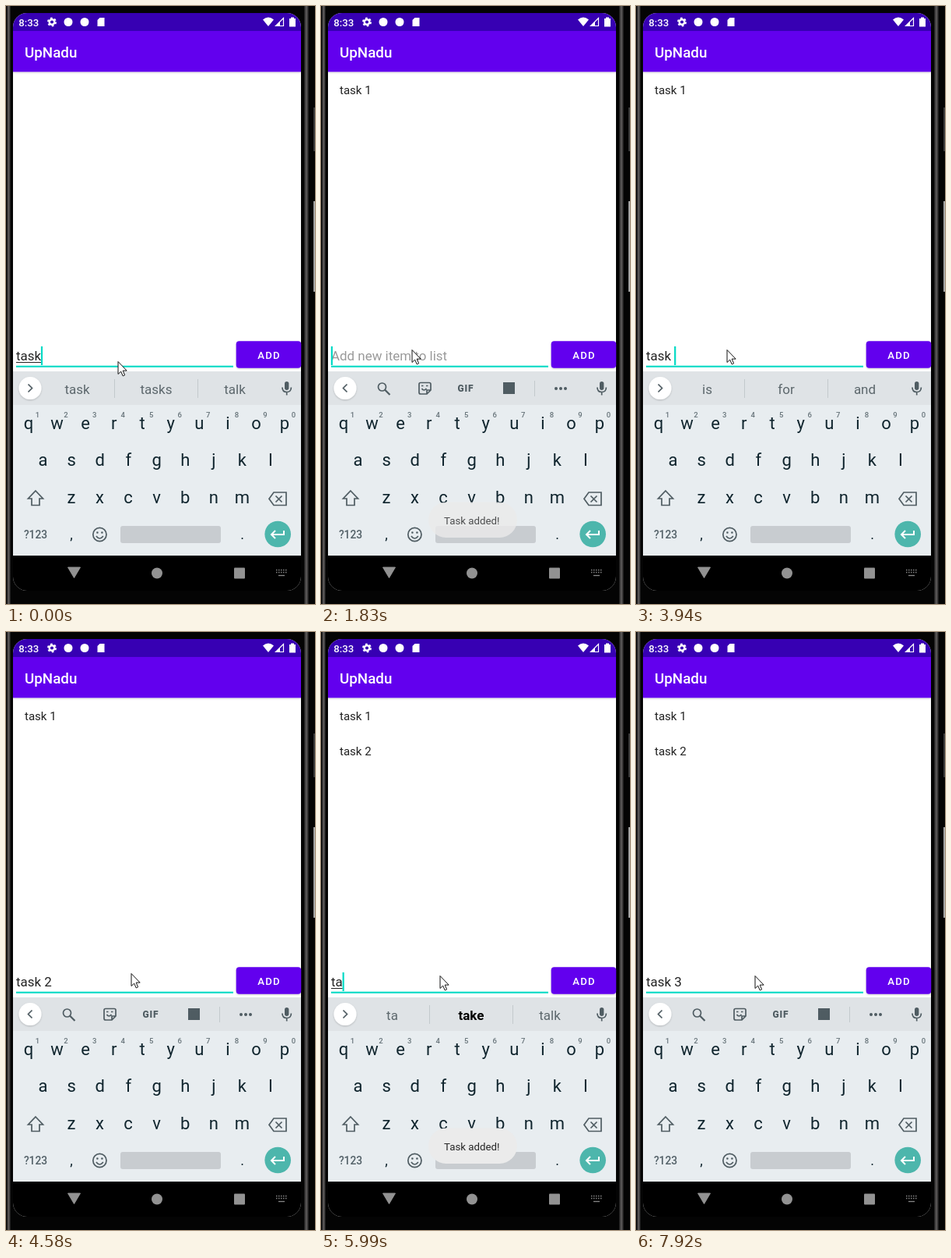
An HTML page for the animation above (8000 ms loop, 397x766 px).

```html
<!DOCTYPE html>
<html lang="en">
<head>
<meta charset="utf-8">
<style>
  html, body { margin: 0; width: 100%; height: 100%; overflow: hidden; background: #000 }
  svg { display: block; font-family: Roboto, sans-serif }
  text { white-space: pre }
  .mid { text-anchor: middle }
  .line { fill: none; stroke: #4f5c62; stroke-width: 1.7 }
  .key { font-size: 22px; fill: #10252e }
  .mark { font-size: 18px; fill: #10252e }
  .num { font-size: 9.5px; font-weight: 500; fill: #667379 }
  .word { font-size: 17px; fill: #5c676c }
</style>
</head>
<body>
<svg width="397" height="766" viewBox="0 0 397 766">
  <defs>
    <clipPath id="screen"><rect x="9" y="9" width="370" height="740" rx="18"/></clipPath>
    <filter id="shadow" x="-20%" y="-20%" width="140%" height="150%">
      <feDropShadow dx="0" dy="1" stdDeviation=".8" flood-opacity=".2"/>
    </filter>
    <linearGradient id="rim">
      <stop stop-color="#1a1919"/><stop offset=".5" stop-color="#625f5f"/><stop offset="1" stop-color="#111"/>
    </linearGradient>
  </defs>

  <!-- phone body -->
  <rect width="397" height="766" fill="#040404"/>
  <rect x="1" width="5" height="766" fill="url(#rim)"/>
  <rect x="383" width="6" height="766" fill="url(#rim)"/>
  <path d="M396 130V186" stroke="#3a3a3a" stroke-width="2"/>
  <path d="M396 250V366" stroke="#a5a5a5" stroke-width="2"/>

  <g clip-path="url(#screen)">
    <rect x="9" y="9" width="370" height="740" fill="#fff"/>
    <rect x="9" y="32" width="370" height="52.3" fill="#6200ee" filter="url(#shadow)"/>
    <rect x="9" y="9" width="370" height="23" fill="#3700b3"/>
    <rect x="9" y="468" width="370" height="43" fill="#dfe3e6"/>
    <rect x="9" y="511" width="370" height="193" fill="#e8edf0"/>
    <rect x="9" y="704" width="370" height="45"/>
  </g>

  <!-- status and title bars -->
  <g fill="#fff">
    <text x="16.3" y="25.5" font-size="13.2" font-weight="500">8:33</text>
    <g fill="none" stroke="#fff">
      <circle cx="59" cy="20.5" r="3.3" stroke-width="2.4"/>
      <circle cx="59" cy="20.5" r="5" stroke-width="2" stroke-dasharray="2.6 2.636"/>
    </g>
    <circle cx="80" cy="20.5" r="5.5"/>
    <circle cx="101" cy="20.5" r="5.5"/>
    <path d="M120.500 15H126.500V26H117.500V18Z"/>
    <path d="M330 17.5Q337 11.500 344 17.5L337 26Z"/>
    <path d="M346.500 25.500H356.500V15.500Z" fill="none" stroke="#fff" stroke-width="1.2"/>
    <path d="M346 26H352V20Z"/>
    <path d="M364 16H366V14.500H370V16H372V26.500H364Z"/>
    <text x="24" y="65.500" font-size="18.8" font-weight="500">UpNadu</text>
  </g>

  <g font-size="15.06" fill="#222">
    <text id="item1" x="24" y="113">task 1</text>
    <text id="item2" x="24" y="158">task 2</text>
  </g>

  <!-- entry field and button -->
  <rect x="13" y="460.700" width="279" height="2.1" fill="#03dac5"/>
  <text id="entry" x="13" y="454" font-size="16.95"></text>
  <path id="composing" stroke="#222"/>
  <rect id="caret" y="436" width="2.2" height="24" fill="#03dac5"/>
  <rect x="295.700" y="429.200" width="83.5" height="34.5" rx="4" fill="#6200ee" filter="url(#shadow)"/>
  <rect id="press" x="295.700" y="429.200" width="83.5" height="34.5" rx="4" fill="#fff" opacity=".22"/>
  <text x="323.300" y="452" font-size="13.2" font-weight="500" letter-spacing="1.18" fill="#fff">ADD</text>

  <!-- strip above the keys -->
  <circle cx="31" cy="489.500" r="14.500" fill="#fff" filter="url(#shadow)"/>
  <path id="chevron" class="line"/>
  <g id="words" class="mid word">
    <path d="M139.500 478V502M246.500 478V502" stroke="#c3c9cc"/>
    <text x="91.500" y="496.500"></text>
    <text x="193" y="496.500"></text>
    <text x="294" y="496.500"></text>
  </g>
  <g id="tools" class="line">
    <circle cx="78.500" cy="488" r="5"/>
    <path d="M82 491.500L88.500 498" stroke-width="2.2"/>
    <path d="M128 482.500H139Q141 482.500 141 484.500V492L136 497H128Q126 497 126 495V484.500Q126 482.500 128 482.500ZM136 497V492H141M129.500 490Q132 494 135.500 490"/>
    <path d="M129 486.500H131.500M135 486.500H137.500"/>
    <text x="175.500" y="494" font-size="12" font-weight="900" letter-spacing=".8" fill="#4f5c62" stroke="none">GIF</text>
    <rect x="234" y="482" width="15" height="15" fill="#4f5c62" stroke="none"/>
    <path d="M274.500 480V500" style="stroke:#c3c9cc;stroke-width:1"/>
    <path d="M302 490h.01M308 490h.01M314 490h.01" style="stroke-width:4;stroke-linecap:round"/>
  </g>
  <rect x="358" y="481" width="5.4" height="11" rx="2.7" fill="#4f5c62"/>
  <path class="line" d="M355 488.500Q355 494.500 360.700 494.500T366.400 488.500M360.700 494.500V498.500"/>

  <!-- keyboard -->
  <g id="keys" class="mid"></g>
  <text class="mid" x="38" y="682" font-size="13.8" font-weight="500" fill="#526067">?123</text>
  <path class="line" d="M38 621L47.500 631H43V639.500H33V631H28.500Z"/>
  <path class="line" d="M344 623H360V639.500H344L338 631.200ZM346.500 627.500L354.500 635.500M354.500 627.500L346.500 635.500"/>
  <circle class="line" cx="120.400" cy="677" r="8.6"/>
  <path class="line" d="M115.900 679Q120.400 685 124.900 679"/>
  <path d="M117.400 674.500h.01M123.400 674.500h.01" stroke="#4f5c62" stroke-width="2.6" stroke-linecap="round"/>
  <rect x="147" y="666" width="129" height="22" rx="3" fill="#c8ccd0"/>
  <circle cx="349.200" cy="676.500" r="16.800" fill="#4db6ac"/>
  <path d="M357 672V677H341.500M346 672L341 677L346 682" fill="none" stroke="#fff" stroke-width="2"/>

  <!-- navigation -->
  <g fill="#929292">
    <path d="M79.500 719H95.500L87.500 732.500Z" stroke="#929292" stroke-linejoin="round"/>
    <circle cx="194" cy="726.500" r="7"/>
    <rect x="293" y="719.500" width="14" height="14" rx="1"/>
    <path d="M347 722.500H361M347 725.500H361" stroke="#858585" stroke-width="1.3" stroke-dasharray="1.5 1.5"/>
    <path d="M350 729.500H358" stroke="#858585" stroke-width="1.3"/>
  </g>

  <g id="toast">
    <rect x="138" y="635.500" width="114" height="45.500" rx="22.700" fill="#ebebeb"/>
    <text x="158" y="663.500" font-size="13.3" fill="#262626">Task added!</text>
  </g>

  <path id="pointer" d="M0 0V16L3.700 12.600L6.200 18.400L8.600 17.300L6.200 11.600H11.200Z" fill="#fff" stroke="#111"/>
</svg>

<script>
const $ = id => document.getElementById(id);
const show = (id, on) => $(id).style.display = on ? '' : 'none';

const rows = [['qwertyuiop', 29, 542], ['asdfghjkl', 47.6, 589], ['zxcvbnm', 84, 637]];
let keys = '';
for (const [letters, left, y] of rows)
  [...letters].forEach((c, i) => {
    const x = left + 36.55 * i;
    keys += `<text class="key" x="${x}" y="${y}">${c}</text>`;
    if (letters.length == 10)
      keys += `<text class="num" x="${x + 11.5}" y="527">${(i + 1) % 10}</text>`;
  });
$('keys').innerHTML = keys + '<text class="mark" x="84" y="683">,</text><text class="mark" x="303.5" y="683">.</text>';

const typing = [
  [0, 'task'], [150, 'task '], [430, 'task 1'], [1560, ''],
  [2380, 't'], [2660, 'ta'], [2810, 'tas'], [3090, 'task'], [3790, 'task '], [4060, 'task 2'], [5130, ''],
  [5690, 't'], [5990, 'ta'], [6300, 'tas'], [6580, 'task'], [7250, 'task '], [7400, 'task 3']
];
const suggestions = {
  't': ['t', 'the', 'to'],
  'ta': ['ta', 'take', 'talk'],
  'tas': ['tas', 'task', 'taste'],
  'task': ['task', 'tasks', 'talk'],
  'task ': ['is', 'for', 'and']
};
const caretOff = [860, 2100, 3520, 4580, 6980, 7920];
const toasts = [1700, 5260];

// Each trip to the button: start, start height, end height, sampled x
const trips = [
  [0, 455, 455, [143]],
  [1140, 455, 440, [165, 238, 305, 316, 214, 116]],
  [4580, 437, 440, [160, 248, 312, 318, 318, 232, 152]]
];

function toastAlpha(t) {
  const age = t - toasts.findLast(s => t >= s);
  return age < 125 ? .3 : age < 250 ? .8 : age < 1965 ? 1 : age < 2100 ? .6 : 0;
}

function draw(t) {
  const [since, text] = typing.findLast(([at]) => t >= at);
  const entry = $('entry');
  entry.textContent = text || 'Add new item to list';
  entry.setAttribute('fill', text ? '#222' : '#9a9a9a');
  const end = 13 + (text ? entry.getComputedTextLength() : 0);
  $('caret').setAttribute('x', end - .2);
  show('caret', !caretOff.some(at => at >= since && t >= at && t < at + 500));

  const words = suggestions[text];
  $('composing').setAttribute('d', words && !text.endsWith(' ') ? `M13 456.500H${end}` : '');
  show('words', words);
  show('tools', !words);
  $('tools').style.opacity = text && t - since < 120 ? .5 : 1;
  $('chevron').setAttribute('d', words ? 'M28.500 484.500L33.500 489.500L28.500 494.500' : 'M33.500 484.500L28.500 489.500L33.500 494.500');
  if (words) $('words').querySelectorAll('text').forEach((el, i) => {
    const best = i == 1 && text.startsWith('ta') && text.length < 4;
    el.textContent = words[i];
    el.style.fontWeight = best ? 700 : 400;
    el.style.fill = best ? '#000' : '';
  });

  show('item1', t >= 1560);
  show('item2', t >= 5130);
  show('press', t >= 1410 && t < 1700 || t >= 4850 && t < 5130);
  $('toast').style.opacity = toastAlpha(t);

  const [start, y0, y1, xs] = trips.findLast(([at]) => t >= at);
  const last = xs.length - 1;
  const step = Math.min(last, Math.floor((t - start) / 135));
  const y = y0 + (y1 - y0) * (last ? step / last : 0);
  $('pointer').setAttribute('transform', `translate(${xs[step] + 1} ${y + .5})`);
}

function tick() {
  draw(performance.now() % 8000);
  requestAnimationFrame(tick);
}
tick();
</script>
</body>
</html>
```
